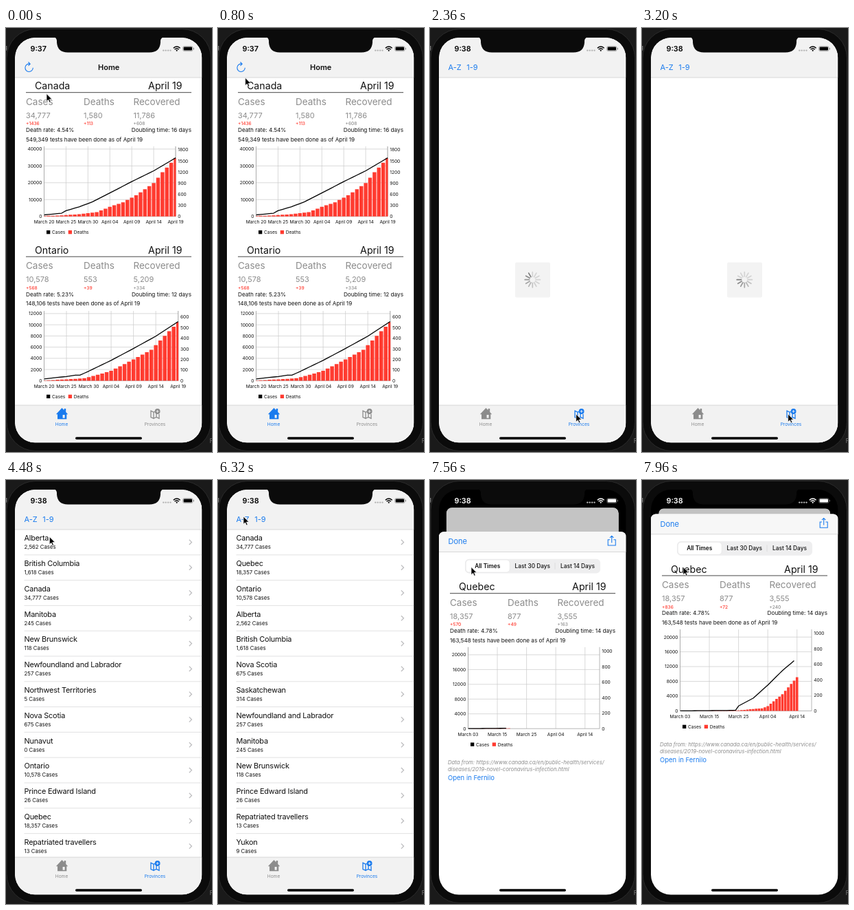
Animation of 300x616 px, one loop 8000 ms. Source, as an HTML page:

```html
<!DOCTYPE html>
<html lang="en">
<head>
<meta charset="utf-8">
<title>Case tracker</title>
<style>
  html, body { margin: 0; width: 100%; height: 100%; overflow: hidden; background: #101010; }
  svg { display: block; width: 100vw; height: 100vh; font-family: Inter, Roboto, "Liberation Sans", sans-serif; }
</style>
</head>
<body>
<svg id="stage" viewBox="0 0 300 616"></svg>
<script>
const LOOP = 8000, STEP = 40;
const BLUE = '#1a7bee', RED = '#ff3b30', GRAY = '#8c8c8c', BAR = '#f2f2f2', SHEET_BAR = '#f7f7f7', LINE = '#c9c9c9';
const AT = { reload: 835, provinces: 2250, loaded: 3640, sorted: 5300, press: 7080, chart: 7165, count: 7218.75, sheet: 7294 };
const SHEET_TOP = 49.5;

// ---- markup helpers ----
// Text is placed by the middle of its capital letters.
const text = (x, cy, size, str, o = {}) =>
  `<text x="${x}" y="${(cy + size * 0.36).toFixed(2)}" font-size="${size}" fill="${o.fill || '#111'}"` +
  ` text-anchor="${o.anchor || 'start'}" font-weight="${o.weight || 400}"` +
  `${o.spacing ? ` letter-spacing="${o.spacing}"` : ''}${o.italic ? ' font-style="italic"' : ''}` +
  `${o.id ? ` id="${o.id}"` : ''}>${str}</text>`;
const rect = (x, y, w, h, fill, extra = '') =>
  `<rect x="${x}" y="${y}" width="${w}" height="${h}" fill="${fill}" ${extra}/>`;
const path = (d, stroke, width, extra = '') =>
  `<path d="${d}" fill="none" stroke="${stroke}" stroke-width="${width}" ${extra}/>`;
const hline = (x1, x2, y, color, width = 0.7) => path(`M${x1} ${y}H${x2}`, color, width);

// ---- charts ----
const PLOT_LEFT = 55.5;

function sample(points, i) {
  const k = Math.max(1, points.findIndex(p => p[0] >= i));
  const [a, b] = [points[k - 1], points[k]];
  return i <= a[0] ? a[1] : a[1] + (b[1] - a[1]) * (i - a[0]) / (b[0] - a[0]);
}

// left (cases) and right (deaths) scales: [value per step, pixels per step, steps]
const regions = {
  canada: {
    name: 'Canada', dy: 0, values: ['34,777', '1,580', '11,786'], added: [1436, 113, 608],
    rate: '4.54%', doubling: 16, tests: '549,349', top: 172, base: 273.7, edge: 247, days: 31, every: 5,
    ticks: ['March 20', 'March 25', 'March 30', 'April 04', 'April 09', 'April 14', 'April 19'],
    left: [10000, 24.45, 4], right: [300, 16.1, 6],
    cases: [[0, 900], [4, 1900], [5, 3409], [8, 5655], [11, 8591], [15, 13912], [20, 20690], [25, 27063], [30, 34777]],
    deaths: [[0, 12], [4, 27], [8, 61], [12, 114], [15, 259], [18, 381], [21, 570], [25, 903], [27, 1195], [30, 1580]]
  },
  ontario: {
    name: 'Ontario', dy: 238.5, values: ['10,578', '553', '5,209'], added: [568, 39, 334],
    rate: '5.23%', doubling: 12, tests: '148,106', top: 411, base: 512.4, edge: 250.7, days: 31, every: 5,
    left: [2000, 16.25, 6], right: [100, 15.4, 6],
    cases: [[0, 318], [5, 750], [7, 1000], [8, 980], [10, 1706], [15, 3630], [20, 5759], [25, 7953], [30, 10578]],
    deaths: [[0, 2], [5, 13], [9, 23], [10, 33], [13, 67], [15, 94], [20, 200], [24, 291], [27, 423], [30, 553]]
  },
  quebec: {
    name: 'Quebec', dy: 45.2, values: ['18,357', '877', '3,555'], added: [836, 72, 240],
    rate: '4.78%', doubling: 14, tests: '163,548', top: 217, base: 335.4, edge: 247, days: 46, every: 10,
    ticks: ['March 03', 'March 15', 'March 25', 'April 04', 'April 14'],
    left: [4000, 21.45, 5], right: [200, 22.5, 5],
    cases: [[0, 0], [16, 120], [19, 180], [20, 1339], [25, 3430], [30, 6997], [35, 10912], [40, 14248], [45, 18357]],
    deaths: [[0, 0], [20, 6], [25, 25], [28, 33], [30, 61], [35, 216], [40, 435], [45, 877]]
  }
};
regions.ontario.ticks = regions.canada.ticks;

const dayX = (r, i) => PLOT_LEFT + i * (r.edge - PLOT_LEFT) / (r.days - 1);
const level = (r, scale, value) => r.base - value / scale[0] * scale[1];

function chartMarkup(id, r) {
  let out = `<clipPath id="${id}-plot">${rect(PLOT_LEFT, r.top, r.edge - PLOT_LEFT + 0.5, r.base - r.top + 1, '#000')}</clipPath>`;
  r.ticks.forEach((label, i) => {
    const x = dayX(r, i * r.every);
    out += path(`M${x} ${r.top}V${r.base}`, LINE, 0.7) + text(x, r.base + 8, 6.6, label, { anchor: 'middle' });
  });
  for (let i = 0; i <= r.left[2]; i++) {
    const y = r.base - i * r.left[1];
    out += hline(PLOT_LEFT, r.edge, y, i ? LINE : '#999') +
      text(52.3, y, 6.6, i * r.left[0], { anchor: 'end' });
  }
  for (let i = 0; i <= r.right[2]; i++) out += text(r.edge + 3.3, r.base - i * r.right[1], 6.6, i * r.right[0]);
  out += path(`M${PLOT_LEFT} ${r.top}V${r.base}M${r.edge} ${r.top}V${r.base}`, '#999', 0.7);
  out += `<g clip-path="url(#${id}-plot)"><path id="${id}-bars" fill="${RED}"/>` +
    path('', '#000', 1.3, `id="${id}-line" stroke-linejoin="round"`) + '</g>';
  const y = r.base + 23;
  return out + rect(59, y - 2.7, 5.3, 5.3, '#000') + text(67, y, 6.6, 'Cases') +
    rect(90.7, y - 2.7, 5.3, 5.3, RED) + text(98.7, y, 6.6, 'Deaths');
}

function regionMarkup(id, r) {
  const y = v => v + r.dy;
  const columns = ['Cases', 'Deaths', 'Recovered'].map((title, i) => {
    const x = [29, 113, 185.5][i];
    return text(x, y(107), 13.5, title, { fill: GRAY }) +
      text(x, y(127), 11, r.values[i], { fill: GRAY }) +
      text(x, y(139), 6.6, '', { fill: i < 2 ? RED : GRAY, weight: 500, id: `${id}-add${i}` });
  }).join('');
  return text(42, y(84.3), 14.2, r.name) + text(256.5, y(84.3), 14.2, 'April 19', { anchor: 'end' }) +
    hline(29, 270, y(93.7), '#333', 0.9) + columns +
    text(29, y(148.3), 8.2, 'Death rate: ' + r.rate) +
    text(270, y(148.3), 8.2, `Doubling time: ${r.doubling} days`, { anchor: 'end' }) +
    text(29, y(162), 8.2, r.tests + ' tests have been done as of April 19') + chartMarkup(id, r);
}

// ---- province list ----
const provinces = [
  ['Alberta', 2562], ['British Columbia', 1618], ['Canada', 34777], ['Manitoba', 245], ['New Brunswick', 118],
  ['Newfoundland and Labrador', 257], ['Northwest Territories', 5], ['Nova Scotia', 675], ['Nunavut', 0],
  ['Ontario', 10578], ['Prince Edward Island', 26], ['Quebec', 18357], ['Repatriated travellers', 13],
  ['Saskatchewan', 314], ['Yukon', 9]
];
const ROW = 36.8;
const listMarkup = rows => rows.slice(0, 13).map(([name, count], i) => {
  const y = 72 + i * ROW;
  return text(26.5, y + 12.2, 10.9, name, { spacing: -0.2 }) +
    text(26.5, y + 25.3, 7.8, count.toLocaleString('en-US') + ' Cases') +
    path(`M266.8 ${y + 14.8}l3.6 3.6l-3.6 3.6`, '#bdbdbf', 1.3) +
    hline(26.5, 285.5, y + ROW, '#d4d4d6');
}).join('');

// ---- icons ----
const house = `<g id="tab-home"><path fill="currentColor" d="M72.8 561.3L81.5 552L84.6 555.2V553H87.2V558L90.2 561.3H88.3V568.3H75V561.3Z"/>
  ${rect(82.6, 562, 3, 4.6, BAR)}${text(81, 576, 6.6, 'Home', { fill: 'currentColor', anchor: 'middle' })}</g>`;
const map = `<g id="tab-map">${path('M211 556.2L215 558.2V567.2L211 565.5ZM215 567.2L219 565.4V559M219 565.4L223 567.2V561M215 558.2L217 557.3', 'currentColor', 1.3)}
  <circle cx="220.6" cy="557" r="3.9" fill="currentColor"/>${path('M218.6 557h4M220.6 555v4', BAR, 0.9)}
  ${text(217, 576, 6.6, 'Provinces', { fill: 'currentColor', anchor: 'middle' })}</g>`;
const refresh = path('M34.5 52.2A5.7 5.7 0 1 0 39.3 57.8M32.5 49.5L35.2 52.2L32.5 54.9', BLUE, 1.1);
const share = path('M262 61H259.2V69.2H270.2V61H267.4M264.7 65.5V55.6M262 58.2L264.7 55.4L267.4 58.2', BLUE, 1.1);
const spokes = Array.from({ length: 12 }, (_, i) =>
  path('M149.3 361V354.6', '#777', 1.7, `class="spoke" stroke-linecap="round" transform="rotate(${i * 30} 149.3 365.7)"`)).join('');
const statusBar = `<g id="status">${text(35.5, 30, 10.8, '', { fill: 'currentColor', weight: 600, id: 'clock' })}
  ${[229.3, 232.7, 236.1, 239.5].map(x => `<circle cx="${x}" cy="32.6" r="1.2" fill="#b5b5b5"/>`).join('')}
  ${path('M243.8 29.2Q248.7 24.8 253.6 29.2M245.6 31.2Q248.7 28.3 251.8 31.2', 'currentColor', 1.4)}
  <circle cx="248.7" cy="32.7" r="1.1" fill="currentColor"/>
  ${rect(257.6, 26.6, 14.4, 7, 'none', 'rx="2" stroke="currentColor" stroke-opacity=".45" stroke-width=".6"')}
  ${rect(258.6, 27.6, 12.4, 5, 'currentColor', 'rx="1.1"')}${rect(272.8, 28.8, 0.9, 2.6, 'currentColor', 'opacity=".5"')}</g>`;

// ---- sheet ----
const segments = rect(51, 89, 197, 20.6, '#eeeeef', 'rx="5.5"') +
  rect(52.2, 90.3, 64, 18, '#fff', 'rx="4.6" stroke="#dcdcdc" stroke-width=".5"') +
  path('M182 94.5V104', '#d5d5d7', 0.7) +
  text(83.7, 99.4, 8.3, 'All Times', { anchor: 'middle', weight: 600 }) +
  text(149.3, 99.4, 8.3, 'Last 30 Days', { anchor: 'middle', weight: 500 }) +
  text(215, 99.4, 8.3, 'Last 14 Days', { anchor: 'middle', weight: 500 });
const sheet = `<g id="sheet">${rect(13, SHEET_TOP, 272.5, 600, '#fff', 'rx="7"')}
  <path d="M13 78.7V56.5a7 7 0 0 1 7-7H278.5a7 7 0 0 1 7 7V78.7Z" fill="${SHEET_BAR}"/>${hline(13, 285.5, 78.7, LINE)}
  ${text(26.5, 63.7, 11, 'Done', { fill: BLUE })}${share}${segments}${regionMarkup('quebec', regions.quebec)}
  ${text(26, 384, 7.75, 'Data from: https://www.canada.ca/en/public-health/services/', { fill: GRAY, italic: true })}
  ${text(26, 394, 7.75, 'diseases/2019-novel-coronavirus-infection.html', { fill: GRAY, italic: true })}
  ${text(26, 406.5, 9.5, 'Open in Fernilo', { fill: BLUE })}</g>`;

// ---- stage ----
const stage = document.getElementById('stage');
stage.innerHTML = `<defs>
    <clipPath id="screen"><rect x="13" y="14" width="272.5" height="588.5" rx="29"/></clipPath>
    <clipPath id="cardClip"><rect id="cardShape" x="13" y="14" width="272.5" height="588.5"/></clipPath>
  </defs>
  ${rect(0, 0, 300, 616, '#1a1a1a')}
  ${text(-3.5, 28, 9, 'g', { fill: '#999' })}${text(296.5, 600, 9, 'F', { fill: '#777' })}
  ${rect(1, 1.5, 297.5, 613, '#0b0b0b', 'rx="42" stroke="#2b2b2b" stroke-width="1"')}
  <g clip-path="url(#screen)">${rect(13, 14, 272.5, 589, '#000')}
    <g id="card"><g clip-path="url(#cardClip)">
      ${rect(13, 14, 272.5, 589, '#fff')}
      <g id="home">${regionMarkup('canada', regions.canada)}${regionMarkup('ontario', regions.ontario)}</g>
      ${rect(13, 72 + ROW, 272.5, ROW, '#c8c8ca', 'id="pressed"')}
      <g id="alpha">${listMarkup(provinces)}</g>
      <g id="ranked">${listMarkup([...provinces].sort((a, b) => b[1] - a[1]))}</g>
      <g id="loader">${rect(124, 340.5, 51, 51, '#f3f3f3', 'rx="2"')}${spokes}</g>
      ${rect(13, 14, 272.5, 58, BAR)}${hline(13, 285.5, 72, LINE)}
      <g id="homeNav">${refresh}${text(149.7, 57.3, 11, 'Home', { anchor: 'middle', weight: 600 })}</g>
      <g id="listNav">${text(26.5, 57.3, 11, 'A-Z', { fill: BLUE })}${text(53.3, 57.3, 11, '1-9', { fill: BLUE })}</g>
      ${rect(13, 548, 272.5, 55, BAR)}${hline(13, 285.5, 548, LINE)}${house}${map}
      ${rect(13, 14, 272.5, 589, '#000', 'id="dim"')}
    </g></g>
    ${sheet}${statusBar}
    ${rect(101, 594.3, 97, 3.4, '#000', 'rx="1.7"')}
  </g>
  <path d="M70 13H230Q225.5 14 225 18.5V21Q224 35.5 209 35.5H90Q75 35.5 74 21V18.5Q73.5 14 70 13Z" fill="#0b0b0b"/>
  <path id="cursor" d="M0 0V11.2L2.6 8.8L4.4 12.8L6.2 12L4.4 8.1H8Z" fill="#000" stroke="#fff" stroke-width=".7"/>`;

// ---- motion ----
const $ = Object.fromEntries([...stage.querySelectorAll('[id]')].map(el => [el.id, el]));
const spokeEls = [...stage.querySelectorAll('.spoke')];
const clamp = v => Math.min(1, Math.max(0, v));
const sine = v => (1 - Math.cos(Math.PI * clamp(v))) / 2;
const show = (el, on) => el.setAttribute('visibility', on ? 'visible' : 'hidden');

const cursorSteps = [
  [0, 59, 95.5], [380, 33, 57], [720, 34, 57], [1420, 212.7, 539], [1850, 212.7, 539], [2100, 212.7, 561],
  [3680, 212.7, 561], [4350, 63.3, 82.5], [4650, 63.3, 82.5], [5000, 61, 56], [5700, 61, 56],
  [6220, 37, 53], [6560, 37, 53], [6980, 60, 126.5], [LOOP, 60, 126.5]
];

function moveCursor(t) {
  const k = cursorSteps.findIndex(s => s[0] > t);
  const [a, b] = [cursorSteps[k - 1], cursorSteps[k]];
  const p = sine((t - a[0]) / (b[0] - a[0]));
  $.cursor.setAttribute('transform', `translate(${a[1] + (b[1] - a[1]) * p} ${a[2] + (b[2] - a[2]) * p})`);
}

function drawChart(id, progress) {
  const r = regions[id], half = (dayX(r, 1) - dayX(r, 0)) * 0.425;
  const p = sine(progress), count = Math.floor(p * r.days);
  const last = p === 1 ? r.days - 1 : count - 2;
  let bars = '', line = '';
  for (let i = 0; i < count; i++) {
    const x = dayX(r, i);
    bars += `M${x - half} ${r.base}V${level(r, r.right, sample(r.deaths, i))}H${x + half}V${r.base}Z`;
    if (i <= last) line += `${i ? 'L' : 'M'}${x} ${level(r, r.left, sample(r.cases, i))}`;
  }
  $[id + '-bars'].setAttribute('d', bars);
  $[id + '-line'].setAttribute('d', line);
}

function drawCounts(id, progress) {
  regions[id].added.forEach((n, i) => {
    $[`${id}-add${i}`].textContent = '+' + Math.floor(n * clamp(progress));
  });
}

function drawSheet(t) {
  const x = Math.max(0, t - AT.sheet) * 0.01826;
  const s = 1 - (1 + x) * Math.exp(-x);
  const k = 1 - 0.083 * s;
  $.sheet.setAttribute('transform', `translate(0 ${(616 - SHEET_TOP) * (1 - s)})`);
  $.card.setAttribute('transform', `translate(${149.25 * (1 - k)} ${14 + 27.5 * s - 14 * k}) scale(${k})`);
  $.cardShape.setAttribute('rx', 29 - 21 * s);
  $.dim.setAttribute('opacity', 0.2 * s);
  $.status.setAttribute('color', s > 0.5 ? '#fff' : '#000');
}

function draw(t) {
  const onHome = t < AT.provinces;
  const started = t >= AT.reload;
  $.clock.textContent = started ? '9:38' : '9:37';
  drawChart('canada', started ? (t - AT.reload) / 1000 : 1);
  drawChart('ontario', started ? (t - AT.reload - 21) / 1000 : 1);
  drawChart('quebec', (t - AT.chart) / 1000);
  for (const id of ['canada', 'ontario']) drawCounts(id, started ? (t - AT.reload) / 500 : 1);
  drawCounts('quebec', (t - AT.count) / 500);

  show($.home, onHome);
  show($.homeNav, onHome);
  show($.listNav, !onHome);
  show($.loader, !onHome && t < AT.loaded);
  show($.alpha, t >= AT.loaded && t < AT.sorted);
  show($.ranked, t >= AT.sorted);
  show($.pressed, t >= AT.press);
  $['tab-home'].setAttribute('color', onHome ? BLUE : GRAY);
  $['tab-map'].setAttribute('color', onHome ? GRAY : BLUE);

  const head = Math.floor(t * 12 / 1000) + 7;
  spokeEls.forEach((el, i) => el.setAttribute('opacity', Math.max(0.25, 0.95 - ((head - i) % 12) * 0.11)));
  drawSheet(t);
  moveCursor(t);
}

const start = performance.now();
function tick() {
  const elapsed = Math.max(0, performance.now() - start);
  draw(Math.round(elapsed / STEP) * STEP % LOOP);
  requestAnimationFrame(tick);
}
tick();
</script>
</body>
</html>
```
